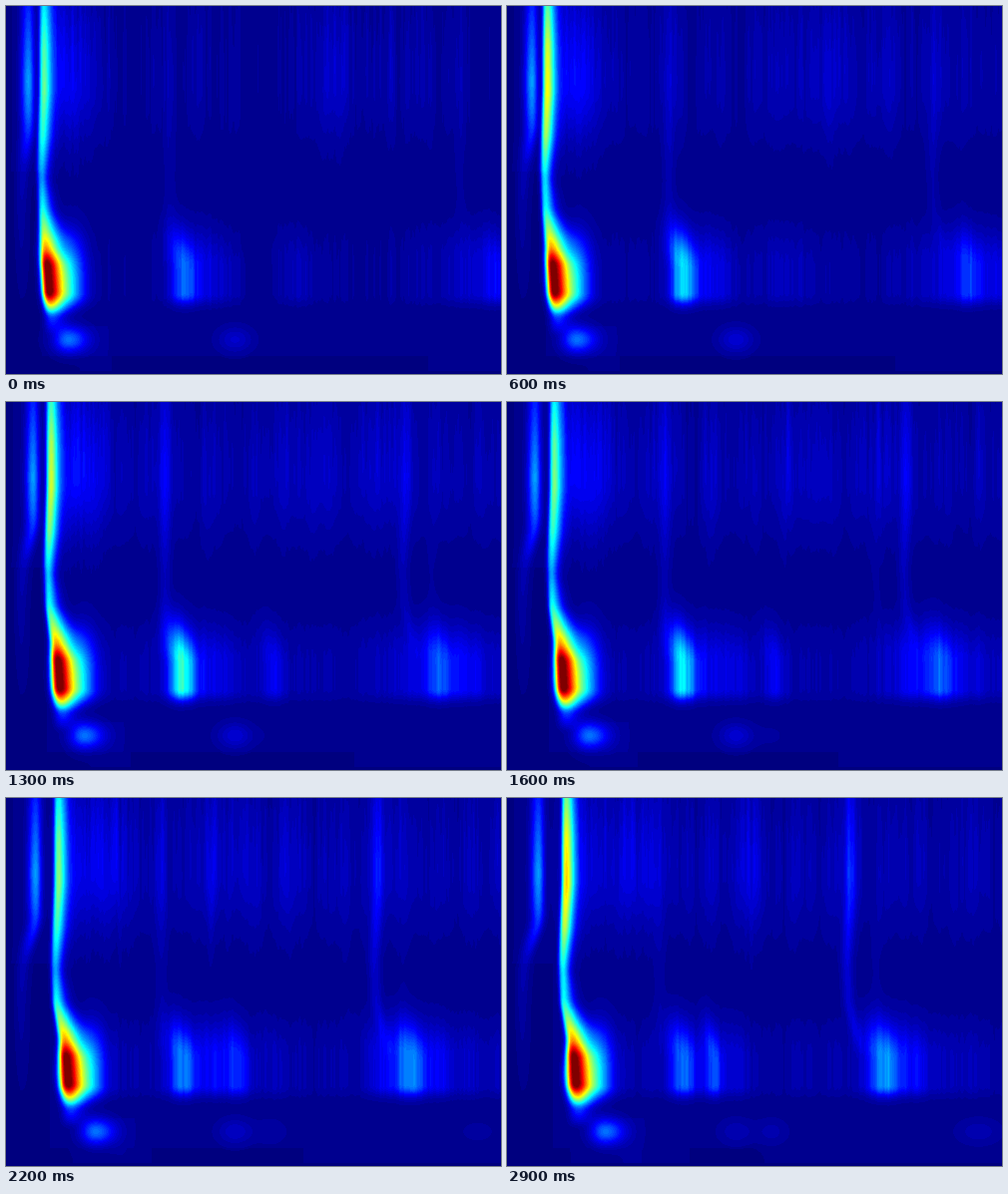
Recreate the animation shown at these times as a matplotlib script. Size 496x369 px, loop 3 s.

```python
import numpy as np
import matplotlib.pyplot as plt
from matplotlib.animation import FuncAnimation
from matplotlib.colors import ListedColormap

W, H = 496, 369
FRAMES, STEP = 30, 100
LAST = (FRAMES - 1) * STEP / 1000

x = np.arange(W)[None, :]
y = np.arange(H)[:, None]
rows = np.arange(H)

# Classic 64-step jet, with one extra dark blue at the low end
s = np.arange(65) / 64
jet = ListedColormap(np.clip(np.stack(
    [1.5 - abs(4 * s - c) for c in (3, 2, 1)], axis=1), 0, 1))

rng = np.random.default_rng(7)


def streaks(count, width):
    """Random column brightness at evenly spaced times."""
    kernel = np.hanning(width + 2)
    out = np.array([np.convolve(r, kernel, "same")
                    for r in rng.normal(size=(count, W))])
    return out / out.std()


fine, coarse = streaks(9, 3), streaks(9, 17)


def blend(table, t):
    p = t / 3 * (len(table) - 1)
    i = int(p)
    return table[i] + (p - i) * (table[i + 1] - table[i])


def curve(ys, values, soft=11):
    """Smooth profile down the stage."""
    v = np.pad(np.interp(rows, ys, values), soft // 2, mode="edge")
    return np.convolve(v, np.ones(soft) / soft, "valid")[:, None]


def bell(v, c, a, b=None):
    d = v - c
    return np.exp(-0.5 * (d / np.where(d < 0, a, b or a)) ** 2)


LOW = bell(y - np.clip(y, 260, 287), 0, 25, 8)
DEEP = bell(y, 334, 9)
LINE = curve([0, 75, 120, 170, 230, 260], [0.6, 1, 0.8, 0.5, 0.45, 0])
BEND = curve([0, 100, 165, 205, 245, 275], [0, 0, -3, -1, 8, 20])
LEAN = curve([205, 260], [-9, 0])

# Centre, width, strength, time of peak, duration
TOP = [
    (205, 4, 4, 2.1, 0.5),
    (245, 8, 4, 2.9, 0.5),
    (280, 7, 3, 1.8, 0.6),
    (312, 14, 1.5, 1.0, 0.7),
    (330, 12, 2, 0.0, 0.6),
    (374, 12, 2, 0.9, 0.7),
]
BOTTOM = [
    (204, 18, 4.5, 1.0, 2.5),
    (207, 5, 7, 2.9, 0.4),
    (232, 9, 6, 2.2, 0.4),
    (268, 8, 5, 1.5, 0.5),
    (290, 14, 2, 0.0, 0.7),
]
FAINT = [
    (229, 12, 4.5, 1.0, 1.7),
    (265, 11, 2, 2.9, 0.9),
    (472, 15, 2.3, 2.9, 0.5),
]


def glow(spots, t, shift=0):
    return sum(a * bell(t, peak, span) * bell(x, cx + shift, w)
               for cx, w, a, peak, span in spots)


def main_ridge(t):
    u = t / LAST
    top = 38 + 21.5 * u ** 1.4
    neck = 35.5 + 20.5 * u ** 1.4
    core = 42.5 + 26 * u ** 1.1
    path = curve([85, 165, 205, 240, 268, 290, 310],
                 [top, neck, neck + 1, core - 3, core - 0.5, core + 1, core + 4])
    a = 33 + 6 * np.cos(2 * np.pi * (t - 0.85) / 2.1)
    level = curve([0, 40, 85, 130, 172, 200, 225, 243, 258, 288, 300, 310, 330],
                  [a * 0.74, a * 0.93, a, a * 0.87, a * 0.56,
                   23, 34, 46, 66, 66, 38, 12, 0], 7)
    left = curve([150, 205, 245, 275], [5, 4.5, 7, 7.5 + 2.5 * u])
    right = curve([130, 175, 205, 232, 270, 298, 312],
                  [8, 6, 9, 16, 18, 17, 11])
    d = x - path
    shape = np.where(d < 0, np.exp(-np.abs(d / left) ** 2.8),
                     np.exp(-np.abs(d / right) ** 1.6))
    halo = 9 * LOW * bell(x, core + 24, 8, 10)
    return level * shape + halo


def left_ridge(t):
    cx = 22 + 9 * (t / LAST) ** 0.8
    path = curve([125, 165, 200], [cx, 17, 15], 21)
    level = curve([0, 75, 105, 135, 160, 200, 300], [9, 17, 14, 8, 3, 2, 0])
    return level * bell(x, path, 5, 4)


def beats(t):
    """Pulses that light up one after another, each further left."""
    out = 0
    for k in range(5):
        cx, peak = 457 - 28.5 * k, 0.75 * k
        out = out + LINE * (1.5 + 1.8 * k) * bell(t, peak, 0.35) * bell(x, cx + BEND, 4)
        blob = 3 * bell(t, peak, 1.2) + (4 + 2.3 * k) * bell(t, peak, 0.4)
        out = out + LOW * blob * bell(x, cx + 34 + LEAN, 11)
    return out


def field(t):
    u = t / LAST
    n, c = blend(fine, t), blend(coarse, t)
    rise = min(t / 1.3, 1)
    high = bell(y + 8 * n, 75, 65, 40)

    base = 0.6 + 0.85 * np.clip(x / 14, 0, 1) + 0 * y
    base = base - 0.6 * (y > 165) * (x < 36 + 10 * u)
    floor = bell(x, 220, 30 + 130 * (1 - u)) + bell(x, 0, 50)
    base = base - (y > 350) * np.minimum(floor, 0.8)
    base = base + 0.8 * (y > 320) * bell(x, 90 + 35 * u, 12)

    tex = high * (0.8 + 1.2 * rise + 0.5 * n + 0.6 * c) * np.clip((x - 40) / 40, 0, 1)
    tex = tex + LOW * (0.4 + 1.1 * rise + 0.3 * n + 0.3 * c) * np.clip((x - 70) / 40, 0, 1)

    wide = high * (3.5 * bell(x, 72 + 52 * u ** 2, 15)
                   + 3.5 * bell(x, 55 + 18 * u, 14) + glow(TOP, t))
    wide = wide + LOW * glow(BOTTOM, t, LEAN)
    wide = wide + LINE * (2 + 3 * bell(t, 1.1, 0.5)) * bell(x, 164 - 4 * t, 4)
    echo = 11 + 14 * bell(t, 1.1, 0.5)
    wide = wide + LOW * echo * bell(x, 177 - t / 2 + LEAN, 9)
    wide = wide + beats(t)

    deep = 14 * bell(x, 62 + 12.4 * t, 10, 13) + glow(FAINT, t)

    v = base + np.maximum(tex, 0) + wide * (1 + 0.06 * n) + DEEP * deep
    v = v + main_ridge(t) + left_ridge(t)
    v[-3:] = 0
    return np.clip(np.floor(v), 0, 64)


fig = plt.figure(figsize=(W / 100, H / 100), dpi=100)
ax = fig.add_axes([0, 0, 1, 1])
ax.axis("off")
image = ax.imshow(field(0), cmap=jet, vmin=-0.5, vmax=64.5,
                  interpolation="nearest", aspect="auto")


def update(i):
    image.set_data(field(i * STEP / 1000))
    return [image]


anim = FuncAnimation(fig, update, frames=FRAMES, interval=STEP,
                     repeat=True, repeat_delay=0, blit=False)
plt.show()
```
